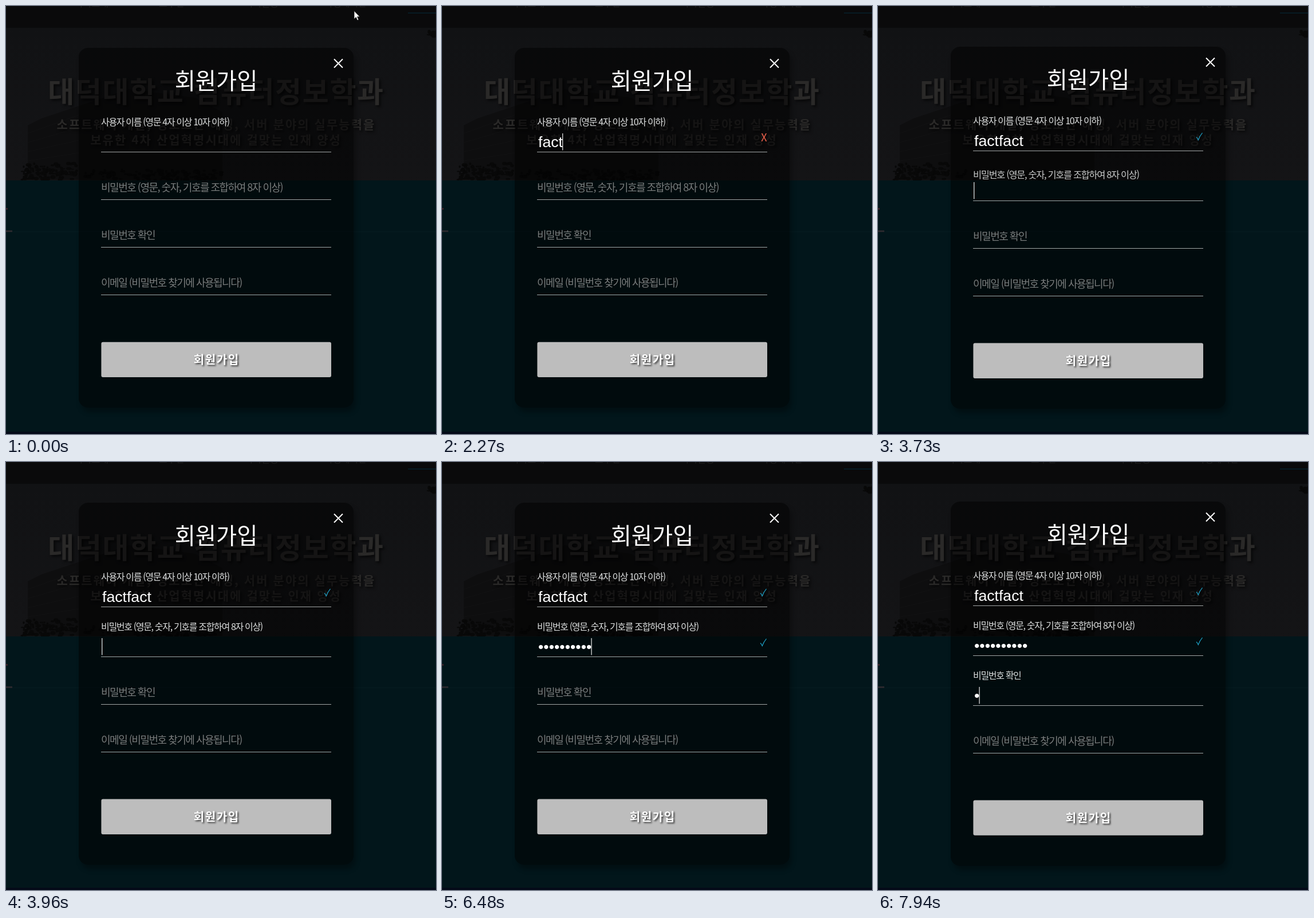
Write an HTML page that moves like this. It is 751 by 746 pixels and loops after 8000 ms.

```html
<!DOCTYPE html>
<html lang="ko">
<head>
<meta charset="utf-8">
<title>회원가입</title>
<style>
  html, body { margin: 0; width: 100%; height: 100%; overflow: hidden; background: #02161b; }
  svg, #panel { position: absolute; left: 0; top: 0; }
  svg { width: 751px; height: 746px; font-family: "Noto Sans CJK KR", "Noto Sans KR", "Noto Sans CJK", sans-serif; }
  #panel {
    left: 127px; width: 480px; border-radius: 16px;
    background: rgba(0, 0, 0, .5); box-shadow: 4px 8px 9px rgba(0, 0, 0, .3);
  }
  .hero { font-weight: 700; fill: #2a2928; text-anchor: middle; filter: drop-shadow(3px 3px 2px rgba(0, 0, 0, .6)); }
  .label { letter-spacing: -.083em; }
  .value { font: 26.67px "Liberation Sans", Arial, sans-serif; fill: #fff; white-space: pre; }
  .button { font-size: 20px; font-weight: 700; letter-spacing: 1.6px; text-anchor: middle; fill: #fff;
    filter: drop-shadow(2px 2px 1.5px rgba(0, 0, 0, .7)); }
</style>
</head>
<body>
<svg id="page" viewBox="0 0 751 746">
  <defs>
    <linearGradient id="sky" x2="0" y2="1">
      <stop offset="0" stop-color="#111214"/><stop offset="1" stop-color="#141416"/>
    </linearGradient>
    <clipPath id="photo"><rect y="38" width="751" height="266"/></clipPath>
  </defs>
  <rect width="751" height="746" fill="#02161b"/>
  <rect width="751" height="38" fill="#0a0a0b"/>
  <g font-size="16" fill="#1d1d1d">
    <text x="120" y="1">학과소개</text><text x="267" y="1">교수진</text>
    <text x="417" y="1">학과활동</text><text x="556" y="1">학생게시판</text>
  </g>
  <rect x="702" y="11.5" width="49" height="1.5" fill="#06212c"/>
  <g id="scene" clip-path="url(#photo)">
    <rect y="38" width="751" height="266" fill="url(#sky)"/>
    <path d="M38 303V208L62 196 215 145 330 160 378 185V303Z" fill="#0e0e0f"/>
    <path d="M38 222 127 190M38 238 127 212M38 254 127 234M38 270 127 256" stroke="#121213" fill="none"/>
  </g>
  <text class="hero" x="367" y="168" font-size="50" letter-spacing="1.65">대덕대학교 컴퓨터정보학과</text>
  <g class="hero" font-size="21" letter-spacing="2.05">
    <text x="367" y="213.5">소프트웨어 개발, 정보보안 해킹, 서버 분야의 실무능력을</text>
    <text x="366.5" y="241">보유한 4차 산업혁명시대에 걸맞는 인재 양성</text>
  </g>
  <rect y="393" width="751" height="1" fill="#061b20"/>
  <rect y="391" width="11" height="3" fill="#29282d"/>
  <rect y="352" width="3" height="3" rx="1" fill="#3d2028"/>
  <rect y="742" width="751" height="4" fill="#040a18"/>
</svg>
<div id="panel"></div>
<svg id="form" viewBox="0 0 751 746">
  <g id="head">
    <text x="367" y="145" font-size="39.3" text-anchor="middle" fill="#fff">회원가입</text>
    <path d="M573 92.5 588 107.5M588 92.5 573 107.5" stroke="#fff" stroke-width="2"/>
  </g>
  <g id="fields"></g>
  <g id="submit">
    <rect x="166.4" y="585.7" width="401.6" height="61.4" rx="3" fill="#bdbdbd"/>
    <text class="button" x="367.8" y="624">회원가입</text>
  </g>
  <rect id="caret" width="1.3" height="29.5" fill="#dcdcdc"/>
  <path id="mouse" d="M0 0V14.2L3.3 11.1 5.6 16.6 7.9 15.6 5.6 10.3H10Z" fill="#fff" stroke="#111" stroke-width=".8"/>
</svg>
<script>
const LOOP = 8000;
const LEFT = 166, TEXT_LEFT = 168, TOP = 254.2, PITCH = 83.1, GROW = 3.7;
const OPEN_AT = [-1000, 3580, 6860];
const BLINK = 530;
const NS = "http://www.w3.org/2000/svg";
const $ = id => document.getElementById(id);

function add(parent, tag, attrs, text) {
  const el = document.createElementNS(NS, tag);
  set(el, attrs);
  if (text) el.textContent = text;
  parent.appendChild(el);
  return el;
}
function set(el, attrs) {
  for (const key in attrs) el.setAttribute(key, attrs[key]);
}
const show = (el, on) => el.setAttribute("visibility", on ? "visible" : "hidden");
const mix = (a, b, p) => a + (b - a) * p;
const clamp = p => Math.min(1, Math.max(0, p));
const countUntil = (times, t) => times.filter(at => at <= t).length;

// CSS "ease" curve, solved by bisection
function ease(p) {
  if (p <= 0 || p >= 1) return clamp(p);
  const curve = (s, a, b) => 3 * a * s * (1 - s) ** 2 + 3 * b * s * s * (1 - s) + s ** 3;
  let lo = 0, hi = 1;
  for (let i = 0; i < 20; i++) {
    const mid = (lo + hi) / 2;
    if (curve(mid, .25, .25) < p) lo = mid; else hi = mid;
  }
  return curve(lo, .1, 1);
}

// foliage along the bottom and in the top right corner of the photo
let seed = 7;
const random = () => (seed = seed * 16807 % 2147483647) / 2147483647;
function foliage(n, x, y, w, h) {
  for (let i = 0; i < n; i++)
    add($("scene"), "ellipse", {
      cx: x + random() * w, cy: y + random() * h,
      rx: 1.5 + random() * 3, ry: 1 + random() * 2.5, fill: "#080808"
    });
}
foliage(160, 28, 286, 350, 18);
foliage(80, 30, 274, 95, 28);
foliage(12, 738, 44, 14, 10);

const specs = [
  { label: "사용자 이름 (영문 4자 이상 10자 이하)", text: "factfact",
    keys: [1510, 1840, 2120, 2270, 2820, 2970, 3170, 3300], bad: 1660, good: 2370 },
  { label: "비밀번호 (영문, 숫자, 기호를 조합하여 8자 이상)", text: "•".repeat(10),
    keys: [4320, 4420, 4520, 4680, 4830, 5770, 6020, 6110, 6200, 6480], bad: 4420, good: 6200 },
  { label: "비밀번호 확인", text: "•", keys: [7940] },
  { label: "이메일 (비밀번호 찾기에 사용됩니다)", text: "", keys: [] }
];
const fields = specs.map(spec => {
  const g = add($("fields"), "g", {});
  return {
    ...spec, g,
    line: add(g, "rect", { x: LEFT, width: 402, height: 1, fill: "#a2a6a6" }),
    title: add(g, "text", { class: "label", x: LEFT }, spec.label),
    value: add(g, "text", { class: "value", x: TEXT_LEFT, y: -8 }),
    cross: add(g, "text", { x: 562.5, y: -18, "font-size": 18, "text-anchor": "middle", fill: "#f0624c" }, "X"),
    check: add(g, "path", { d: "M556 -23.5Q558.3 -21.5 559.3 -18.5Q562 -25.5 566.5 -30.8",
      fill: "none", stroke: "#1d9fc4", "stroke-width": 1.2 })
  };
});

function drawField(f, i, t, opened) {
  const y = Math.floor(TOP + i * PITCH + GROW * (Math.min(i, opened) - opened / 2));
  f.y = y;
  f.g.setAttribute("transform", `translate(0 ${y})`);

  const openAt = OPEN_AT[i];
  const p = openAt !== undefined && t >= openAt ? ease((t - openAt + 40) / 400) : 0;
  const grey = Math.round(mix(122, 222, p));
  set(f.title, {
    y: mix(-14, -46, p), "font-size": mix(18, 16, p),
    fill: `rgb(${grey},${grey + 2},${grey + 2})`
  });

  f.value.textContent = f.text.slice(0, countUntil(f.keys, t));
  show(f.cross, t >= f.bad && t < f.good);
  show(f.check, t >= f.good);
}

function drawCaret(t, opened) {
  const f = fields[opened];
  const typed = f.keys.filter(at => at <= t).pop();
  const start = typed ?? (opened ? OPEN_AT[opened] : 520);
  const on = t >= start && Math.floor((t - start) / BLINK) % 2 === 0;
  show($("caret"), on);
  const width = f.value.textContent ? f.value.getComputedTextLength() : 0;
  set($("caret"), { x: TEXT_LEFT - .9 + width, y: f.y - 32 });
}

function drawMouse(t) {
  const p = clamp((t - 40) / 700);
  const s = p * p * (3 - 2 * p);
  const x = mix(608, 571, s * s), y = mix(8.5, 255, s);
  $("mouse").setAttribute("transform", `translate(${x} ${y})`);
  show($("mouse"), t < 770);
}

function draw(t) {
  const opened = countUntil(OPEN_AT, t) - 1;
  const shift = opened * GROW / 2;
  const snapped = Math.round(shift);
  $("panel").style.top = 73 - snapped + "px";
  $("panel").style.height = 627 + 2 * snapped + "px";
  $("head").setAttribute("transform", `translate(0 ${-snapped})`);
  $("submit").setAttribute("transform", `translate(0 ${shift})`);
  fields.forEach((f, i) => drawField(f, i, t, opened));
  drawCaret(t, opened);
  drawMouse(t);
}

const begin = performance.now();
function tick() {
  draw((performance.now() - begin) % LOOP);
  requestAnimationFrame(tick);
}
tick();
</script>
</body>
</html>
```
